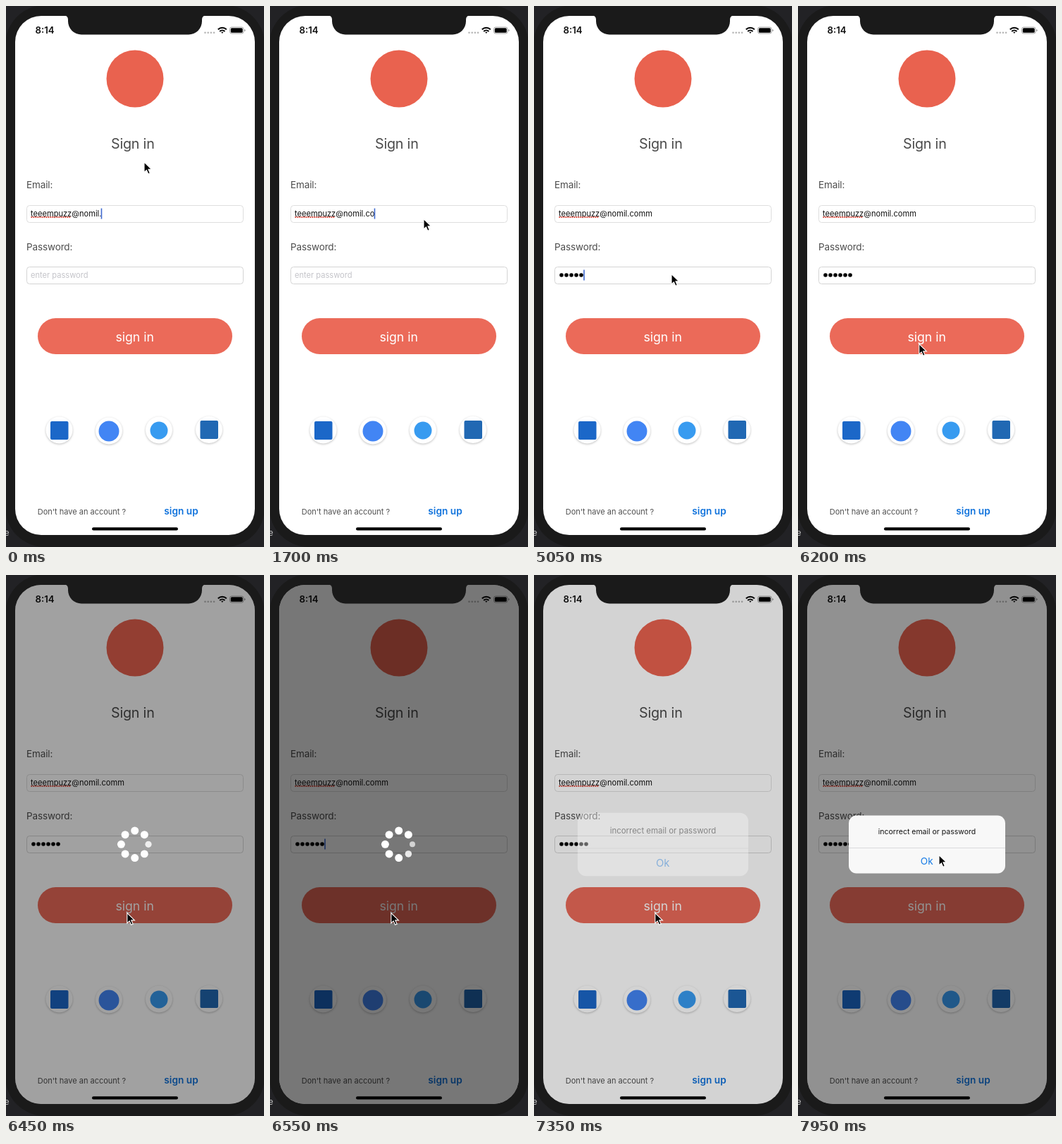
An HTML page for the animation above (8 s loop, 366 by 766 pixels).

```html
<!DOCTYPE html>
<html lang="en">
<head>
<meta charset="utf-8">
<title>Sign in</title>
<style>
  html, body { margin: 0; height: 100%; overflow: hidden; background: #222225; }
  svg { display: block; width: 100%; height: 100%; }
  text { font-family: Inter, "Open Sans", sans-serif; font-size: 11.1px; fill: #111; white-space: pre; }
  .label { font-size: 13.5px; letter-spacing: -.12px; fill: #4c4c4c; }
  .middle { text-anchor: middle; }
  .field { fill: #fff; stroke: #d4d4d4; }
  .plate { fill: #fff; filter: drop-shadow(0 1px 1.5px rgba(0, 0, 0, .25)); }
</style>
</head>
<body>
<svg viewBox="0 0 366 766">
  <defs>
    <clipPath id="screen"><rect x="13" y="14" width="340" height="735" rx="37"/></clipPath>
  </defs>

  <text x="-2" y="750" style="fill:#ccc">e</text>
  <rect x="-1" y="-1" width="368" height="767" rx="56" fill="#1a1a1a"/>

  <g clip-path="url(#screen)">
    <rect x="13" y="14" width="340" height="735" fill="#fff"/>

    <!-- status bar -->
    <text x="41.5" y="39" style="font-size:13.2px;font-weight:600">8:14</text>
    <path d="M282.5 37.8h13" stroke="#b5b5b5" stroke-width="2.6" stroke-linecap="round" stroke-dasharray="0 4.2"/>
    <g fill="none" stroke="#000" stroke-width="2.1">
      <path d="M300.8 33.2a8.6 8.6 0 0 1 12 0M303.2 35.9a5.2 5.2 0 0 1 7.2 0"/>
      <path d="M306.8 36.8l-1.7 0 1.7 2.2 1.7-2.2z" fill="#000" stroke="none"/>
    </g>
    <rect x="317.5" y="30" width="19.5" height="9" rx="2.6" fill="none" stroke="#999" stroke-width=".9"/>
    <rect x="318.8" y="31.3" width="16.9" height="6.4" rx="1.5"/>
    <path d="M338.3 33v3q1.3-.4 1.3-1.5t-1.3-1.5z" fill="#888"/>

    <circle cx="183" cy="103" r="40.5" fill="#e9624f"/>
    <text class="middle" x="179.8" y="202" style="font-size:19.7px;letter-spacing:-.2px;fill:#4a4a4a">Sign in</text>

    <text class="label" x="29" y="258">Email:</text>
    <rect class="field" x="29.5" y="282.5" width="307" height="24" rx="4" style="stroke:#dedede"/>
    <text id="email" x="35" y="298"></text>
    <path d="M36.2 299h57" stroke="#d9463a" stroke-width="2" stroke-linecap="round" stroke-dasharray=".3 2.7"/>

    <text class="label" x="29" y="345.7">Password:</text>
    <rect class="field" x="29.5" y="369.5" width="307" height="24" rx="4"/>
    <text id="placeholder" x="35" y="385" style="fill:#c4c4c9">enter password</text>
    <g id="bullets"></g>
    <rect id="caret" width="1.6" height="15" fill="#3f6ad0"/>

    <rect x="45" y="442" width="276" height="51" rx="25.5" fill="#eb6a59"/>
    <text class="middle" x="182.7" y="474.5" style="font-size:17.7px;fill:#fff">sign in</text>

    <circle class="plate" cx="75.5" cy="600.5" r="19"/>
    <circle class="plate" cx="146" cy="601.5" r="19"/>
    <circle class="plate" cx="217" cy="600.5" r="19"/>
    <circle class="plate" cx="288" cy="600" r="19"/>
    <rect x="63" y="588" width="25.5" height="26" rx="2" fill="#1b67c8"/>
    <circle cx="146" cy="602" r="14.5" fill="#4285f4"/>
    <circle cx="217" cy="601" r="12.5" fill="#389bf0"/>
    <rect x="275.5" y="587" width="25.5" height="26" rx="2" fill="#2168b3"/>

    <text x="44.7" y="720" style="font-size:11px;fill:#505050">Don't have an account ?</text>
    <text x="224.3" y="720" style="font-size:13.7px;font-weight:600;fill:#1173dc">sign up</text>

    <rect id="dim" x="13" y="14" width="340" height="735"/>
    <rect x="122" y="738.3" width="122" height="4.2" rx="2.1"/>
    <g id="spinner" fill="#fff"></g>

    <g id="alert">
      <rect x="72" y="340.5" width="222" height="82" rx="11" fill="#f8f8f8"/>
      <path d="M72 386.5h222" stroke="#dadadc"/>
      <text class="middle" x="183" y="367" style="font-size:10.5px">incorrect email or password</text>
      <text class="middle" x="182.7" y="410" style="font-size:13.6px;fill:#167be6">Ok</text>
    </g>
  </g>

  <path d="M83 13.5q5 .5 5 6v2a19 19 0 0 0 19 19h152a19 19 0 0 0 19-19v-2q0-5.5 5-6z" fill="#1a1a1a"/>
  <path id="pointer" d="M0 0V14.5L3.4 11.4 5.8 16.8 8.3 15.7 6 10.4H10.6Z" stroke="#fff" stroke-width="1.1"/>
</svg>

<script>
const LOOP = 8000;
const EMAIL = "teeempuzz@nomil.comm";
const EMAIL_KEYS = [500, 1100, 1900, 2150];
const PASSWORD_KEYS = [4150, 4340, 4530, 4720, 4910, 5100];
const PASSWORD_FOCUS = 3150;
const SPIN_START = 6320;

// time, x, y of the pointer tip
const POINTER = [
  [0, 196, 221], [700, 196, 221], [1500, 218, 301.5], [2450, 218, 301.5],
  [3050, 195, 379.5], [5300, 195, 379.5], [6000, 171.8, 478.5],
  [7400, 171.8, 478.5], [7850, 200, 396.5], [LOOP, 200, 396.5]
];

const $ = id => document.getElementById(id);
const [email, placeholder, bullets, caret, dim, spinner, alertBox, pointer] =
  ["email", "placeholder", "bullets", "caret", "dim", "spinner", "alert", "pointer"].map($);

function addCircle(parent, cx, cy, r) {
  const circle = document.createElementNS("http://www.w3.org/2000/svg", "circle");
  for (const [name, value] of Object.entries({ cx, cy, r })) circle.setAttribute(name, value);
  return parent.appendChild(circle);
}

const bulletDots = PASSWORD_KEYS.map((_, i) => addCircle(bullets, 39 + 7 * i, 381, 2.8));
const spinnerDots = Array.from({ length: 8 }, (_, i) => {
  const angle = i * Math.PI / 4;
  return addCircle(spinner, 182.7 + 19.3 * Math.cos(angle), 381.3 + 19.3 * Math.sin(angle), 5.5);
});

const ramp = (t, from, to) => Math.min(1, Math.max(0, (t - from) / (to - from)));
const ease = p => p * p * (3 - 2 * p);
const pressed = (keys, t) => keys.filter(key => t >= key).length;

function drawForm(t) {
  const typed = pressed(EMAIL_KEYS, t);
  const count = pressed(PASSWORD_KEYS, t);
  const inPassword = t >= PASSWORD_FOCUS;
  email.textContent = EMAIL.slice(0, EMAIL.length - EMAIL_KEYS.length + typed);
  placeholder.style.opacity = count ? 0 : 1;
  bulletDots.forEach((dot, i) => dot.style.opacity = i < count ? 1 : 0);

  const x = inPassword ? 35.2 + 7 * count : 34.2 + email.getComputedTextLength();
  const phase = t % 1000;
  const typing = [...EMAIL_KEYS, ...PASSWORD_KEYS].some(key => t >= key && t < key + 400);
  caret.setAttribute("x", x);
  caret.setAttribute("y", inPassword ? 373.5 : 286.5);
  caret.style.opacity = typing || phase < 170 || phase > 500 ? 1 : 0;
}

function drawOverlays(t) {
  const loader = ramp(t, SPIN_START - 20, SPIN_START + 200) * (1 - ramp(t, 7060, 7320));
  const shown = ease(ramp(t, 7200, 7550));
  dim.style.opacity = 1 - (1 - .535 * loader) * (1 - .43 * shown);

  spinner.style.opacity = Math.min(1, loader * 1.5);
  spinnerDots.forEach((dot, i) => {
    const age = Math.max(0, (t - SPIN_START) / 1000 - .12 * i) % 1;
    const swing = Math.abs(1 - 2 * age);
    dot.setAttribute("r", 5.5 * (.4 + .6 * swing));
    dot.style.opacity = .3 + .7 * swing;
  });

  const scale = 1.15 - .15 * shown;
  alertBox.style.opacity = shown;
  alertBox.setAttribute("transform", `translate(183 381.5) scale(${scale}) translate(-183 -381.5)`);
}

function drawPointer(t) {
  const next = POINTER.findIndex(stop => stop[0] > t);
  const [t0, x0, y0] = POINTER[next - 1];
  const [t1, x1, y1] = POINTER[next];
  const p = ease(ramp(t, t0, t1));
  pointer.setAttribute("transform", `translate(${x0 + (x1 - x0) * p} ${y0 + (y1 - y0) * p})`);
}

const start = performance.now();
function frame() {
  const t = (performance.now() - start) % LOOP;
  drawForm(t);
  drawOverlays(t);
  drawPointer(t);
  requestAnimationFrame(frame);
}
frame();
</script>
</body>
</html>
```
